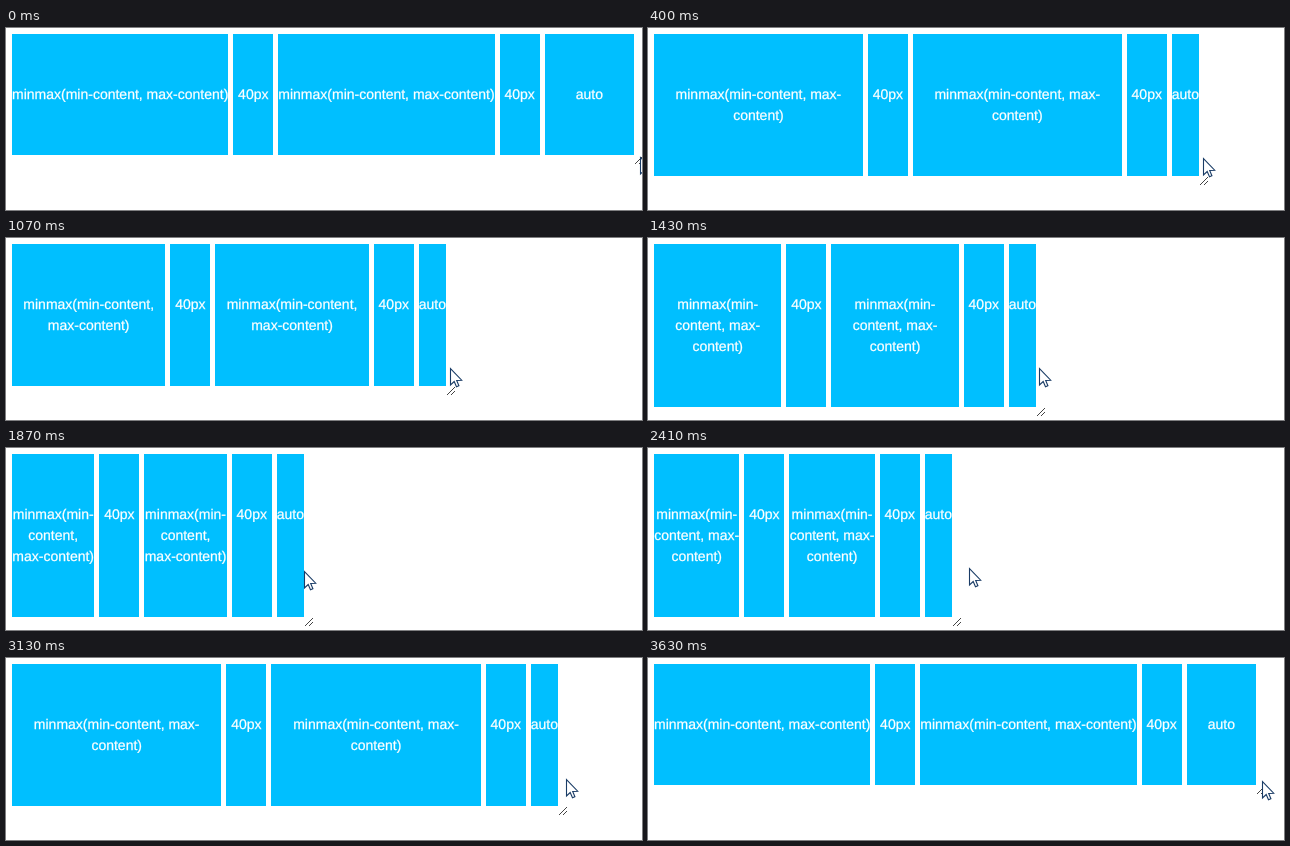
An HTML page with a canvas that plays this animation: 636 px wide and 182 px high, repeating every 5290 ms.

```html
<!DOCTYPE html>
<html lang="en">
<head>
<meta charset="utf-8">
<title>minmax() grid resize</title>
<style>
  html, body { margin: 0; width: 100%; height: 100%; overflow: hidden; background: #fff; }
  body { position: relative; }
  .grid {
    position: absolute; left: 6px; top: 6px;
    display: grid; gap: 5px;
    grid-template-columns: minmax(min-content, max-content) 40px minmax(min-content, max-content) 40px auto;
    font: 14px/21px "Liberation Sans", Arial, sans-serif;
    text-rendering: geometricPrecision;
    -webkit-text-stroke: 0.25px #fff;
    text-align: center; color: #fff;
  }
  .grid div { padding: 50px 0; background: #00bfff; }
  canvas { position: absolute; left: 0; top: 0; }
</style>
</head>
<body>
<div class="grid">
  <div>minmax(min-content, max-content)</div>
  <div>40px</div>
  <div>minmax(min-content, max-content)</div>
  <div>40px</div>
  <div>auto</div>
</div>
<canvas width="636" height="182"></canvas>
<script>
const LOOP = 5290, LEFT = 6, TOP = 6;
const grid = document.querySelector('.grid');
const ctx = document.querySelector('canvas').getContext('2d');

// The drag comes in bursts of evenly spaced steps: first, last, count
const bursts = [
  [150, 400, 5], [610, 1070, 7], [1150, 1650, 8], [1730, 2010, 5],
  [2310, 2780, 7], [2840, 3350, 8], [3410, 3630, 4]
];

// Turning points of the drag: step, right edge, pointer lead, pointer y
const turns = [
  [0, 628, 6, 129],
  [5, 551, 4, 130],
  [8, 514, 4, 130],
  [12, 440, 4, 130],
  [17, 388, 3, 130],
  [23, 298, 0, 123],
  [25, 295, -4, 122],
  [27, 304, 17, 120],
  [33, 488, 10, 119],
  [40, 600, 6, 122],
  [44, 608, 6, 123]
];

function stepAt(t) {
  let step = 0;
  for (const [first, last, count] of bursts) {
    if (t < first) break;
    // Screen times fall on whole hundredths of a second
    const gap = (last - first) / (count - 1);
    for (let i = 0; i < count; i++) {
      if (t >= Math.floor((first + i * gap) / 10) * 10) step++;
    }
  }
  return step;
}

function pose(step) {
  const i = Math.max(1, turns.findIndex(p => p[0] >= step));
  const a = turns[i - 1], b = turns[i];
  const k = (step - a[0]) / (b[0] - a[0]);
  return [1, 2, 3].map(n => Math.round(a[n] + (b[n] - a[n]) * k));
}

function diagonal(x, y, n) {
  for (let i = 0; i < n; i++) ctx.fillRect(x + i, y - i, 1, 1);
}

function drawHandle(right, bottom) {
  ctx.fillStyle = '#444';
  diagonal(right + 1, bottom + 8, 8);
  diagonal(right + 5, bottom + 8, 4);
}

const arrow = new Path2D('M.5 .5v16.5l3.7-3.5 2.3 5.3 2.4-1-2.2-5.3 5-.3z');

function drawPointer(x, y) {
  ctx.save();
  ctx.translate(x, y);
  ctx.fillStyle = '#fff';
  ctx.fill(arrow);
  ctx.strokeStyle = '#1a3c66';
  ctx.lineWidth = 1.1;
  ctx.stroke(arrow);
  ctx.restore();
}

function render(step) {
  const [right, lead, y] = pose(step);
  grid.style.width = right - LEFT + 'px';
  ctx.clearRect(0, 0, 636, 182);
  drawHandle(right, TOP + grid.offsetHeight);
  drawPointer(right + lead, y);
}

const start = performance.now();
let shown = -1;

function loop() {
  const step = stepAt((performance.now() - start) % LOOP);
  if (step !== shown) render(shown = step);
  requestAnimationFrame(loop);
}
loop();
</script>
</body>
</html>
```
